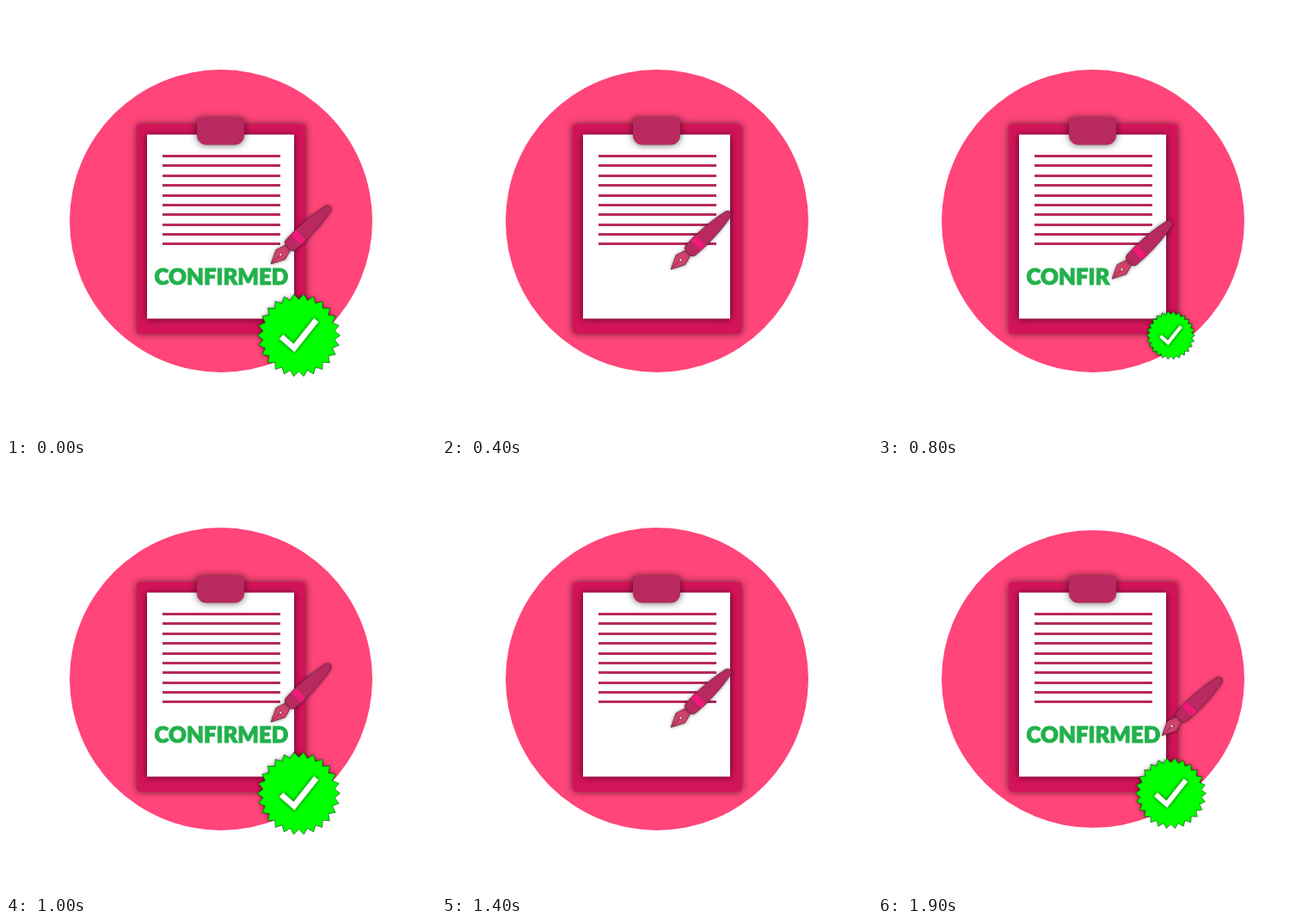
These frames come from a looping animation (500x500 px, 2000 ms). An HTML page with a canvas:

```html
<!DOCTYPE html>
<html lang="en">
<head>
<meta charset="utf-8">
<title>Confirmed</title>
<style>
html, body { margin: 0; height: 100%; overflow: hidden; background: #fff; }
canvas { display: block; width: 100vw; height: 100vh; }
</style>
</head>
<body>
<canvas id="stage" width="500" height="500"></canvas>
<script>
const ctx = document.getElementById('stage').getContext('2d');
const STEP_MS = 100, STEPS = 10;
const ROSE = '#b7295f', BOARD = '#d4145a', LIME = '#0f0', GREEN = '#22b14c';
const WORD = 'CONFIRMED';
const PAPER = { x: 164, y: 149.5, w: 171, h: 214 };
const SEAL_RADII = [48, 41, 28, 14, 0, 0, 0, 14, 28, 41];
const REST = [308, 300], START = [173, 320], END = [330.3, 315.7];
const STROKE_PROGRESS = [0.31, 0.63, 1];

const mix = (a, b, k) => a.map((v, i) => v + (b[i] - v) * k);

function scoped(draw) {
  ctx.save();
  draw();
  ctx.restore();
}

function shadow(blur, alpha) {
  ctx.shadowColor = `rgba(0,0,0,${alpha})`;
  ctx.shadowBlur = blur;
}

function fillBox(x, y, w, h, radii, color) {
  ctx.fillStyle = color;
  ctx.beginPath();
  ctx.roundRect(x, y, w, h, radii);
  ctx.fill();
}

function tracePoly(points, close = true) {
  ctx.beginPath();
  points.forEach(p => ctx.lineTo(...p));
  if (close) ctx.closePath();
}

function discPath(ry) {
  ctx.beginPath();
  ctx.ellipse(250, 250, 176, ry, 0, 0, 2 * Math.PI);
}

function drawLines() {
  ctx.fillStyle = ROSE;
  for (let i = 0; i < 10; i++) ctx.fillRect(182, Math.ceil(172.6 + i * 11.36), 137, 3);
}

function drawWord(progress = 1) {
  const text = WORD.slice(0, Math.round(progress * WORD.length));
  ctx.font = '900 25.7px Lato, sans-serif';
  ctx.fillStyle = ctx.strokeStyle = GREEN;
  ctx.lineWidth = 0.9;
  ctx.lineJoin = 'miter';
  ctx.fillText(text, 172.6, 323.8);
  ctx.strokeText(text, 172.6, 323.8);
}

function drawClipboard() {
  scoped(() => {
    shadow(9, 0.62);
    fillBox(152, 137.5, 196.5, 243.5, 4, BOARD);
    fillBox(PAPER.x, PAPER.y, PAPER.w, PAPER.h, 0, '#fff');
    fillBox(222, 130, 55, 31.5, [3, 3, 11, 11], ROSE);
  });
  drawLines();
}

// Shadows only fall on the disc; outside it just a thin dark edge remains.
function drawSlidingSheet(shift, ry) {
  const { x, w } = PAPER, y = 149, h = 213.5;
  scoped(() => {
    discPath(ry);
    ctx.clip();
    shadow(8, 0.65);
    fillBox(x + shift, y, w, h, 0, '#fff');
  });
  scoped(() => {
    ctx.translate(shift, 0);
    fillBox(x - 1, y - 1, w, h, 0, '#555');
    fillBox(x, y, w, h, 0, '#fff');
    ctx.translate(0, -1);
    drawLines();
    ctx.translate(0.5, 0);
    drawWord();
  });
}

function drawPen([x, y]) {
  const nib = new Path2D('M0 0L16-7.6L28-4V4L16 7.6Z');
  const body = new Path2D('M28-4Q29-8 33-8L47-8.6Q76-8.4 95-3.8Q100 0 95 3.8Q76 8.4 47 8.6L33 8Q29 8 28 4Z');
  scoped(() => {
    ctx.translate(x, y);
    ctx.rotate(-44 * Math.PI / 180);
    ctx.scale(0.985, 1);
    ctx.lineWidth = 0.8;
    ctx.strokeStyle = '#7a2345';

    shadow(4, 0.6);
    ctx.fillStyle = '#d0436a';
    ctx.fill(nib);
    ctx.fillStyle = ROSE;
    ctx.fill(body);
    shadow(0, 0);

    scoped(() => {
      ctx.clip(body);
      ctx.fillStyle = '#f01a78';
      ctx.fillRect(41, -10, 8, 20);
    });
    ctx.stroke(body);
    ctx.stroke(nib);
    tracePoly([[2, 0], [14, 0]], false);
    ctx.stroke();
    ctx.beginPath();
    ctx.arc(16, 0, 1.7, 0, 2 * Math.PI);
    ctx.fillStyle = '#f6dbe3';
    ctx.fill();
    ctx.stroke();
  });
}

function drawSeal(radius, ry) {
  if (!radius) return;
  const teeth = 26, cx = 340.5, cy = 383;
  const rim = Array.from({ length: teeth * 2 }, (_, i) => {
    const r = i % 2 ? radius * 0.87 : radius;
    const a = i * Math.PI / teeth;
    return [cx + r * Math.cos(a), cy + r * Math.sin(a)];
  });
  ctx.fillStyle = LIME;
  scoped(() => {
    discPath(ry);
    ctx.clip();
    shadow(5, 0.6);
    tracePoly(rim);
    ctx.fill();
  });
  scoped(() => {
    tracePoly(rim);
    ctx.fill();
    ctx.strokeStyle = 'rgba(0,60,0,.75)';
    ctx.lineWidth = 0.8;
    ctx.stroke();

    ctx.translate(cx, cy);
    ctx.scale(radius / 48, radius / 48);
    shadow(4, 0.65);
    tracePoly([[-20.5, 1.5], [-5.5, 14.7], [20.3, -17.8]], false);
    ctx.strokeStyle = '#fff';
    ctx.lineWidth = 6.8;
    ctx.stroke();
  });
}

function penTip(step) {
  if (step <= 3) return REST;
  if (step <= 6) return mix(REST, START, STROKE_PROGRESS[step - 4]);
  return mix(START, END, STROKE_PROGRESS[step - 7]);
}

function render(step) {
  const ry = step % 2 ? 173 : 176;
  ctx.fillStyle = '#fff';
  ctx.fillRect(0, 0, 500, 500);
  discPath(ry);
  ctx.fillStyle = '#ff4579';
  ctx.fill();

  drawClipboard();
  if (step === 0) drawWord();
  else if (step <= 3) drawSlidingSheet(-81 * step, ry);
  else if (step >= 7) drawWord(STROKE_PROGRESS[step - 7]);
  drawPen(penTip(step));
  drawSeal(SEAL_RADII[step], ry);
}

function tick() {
  render(Math.floor(performance.now() / STEP_MS) % STEPS);
  requestAnimationFrame(tick);
}
tick();
</script>
</body>
</html>
```
